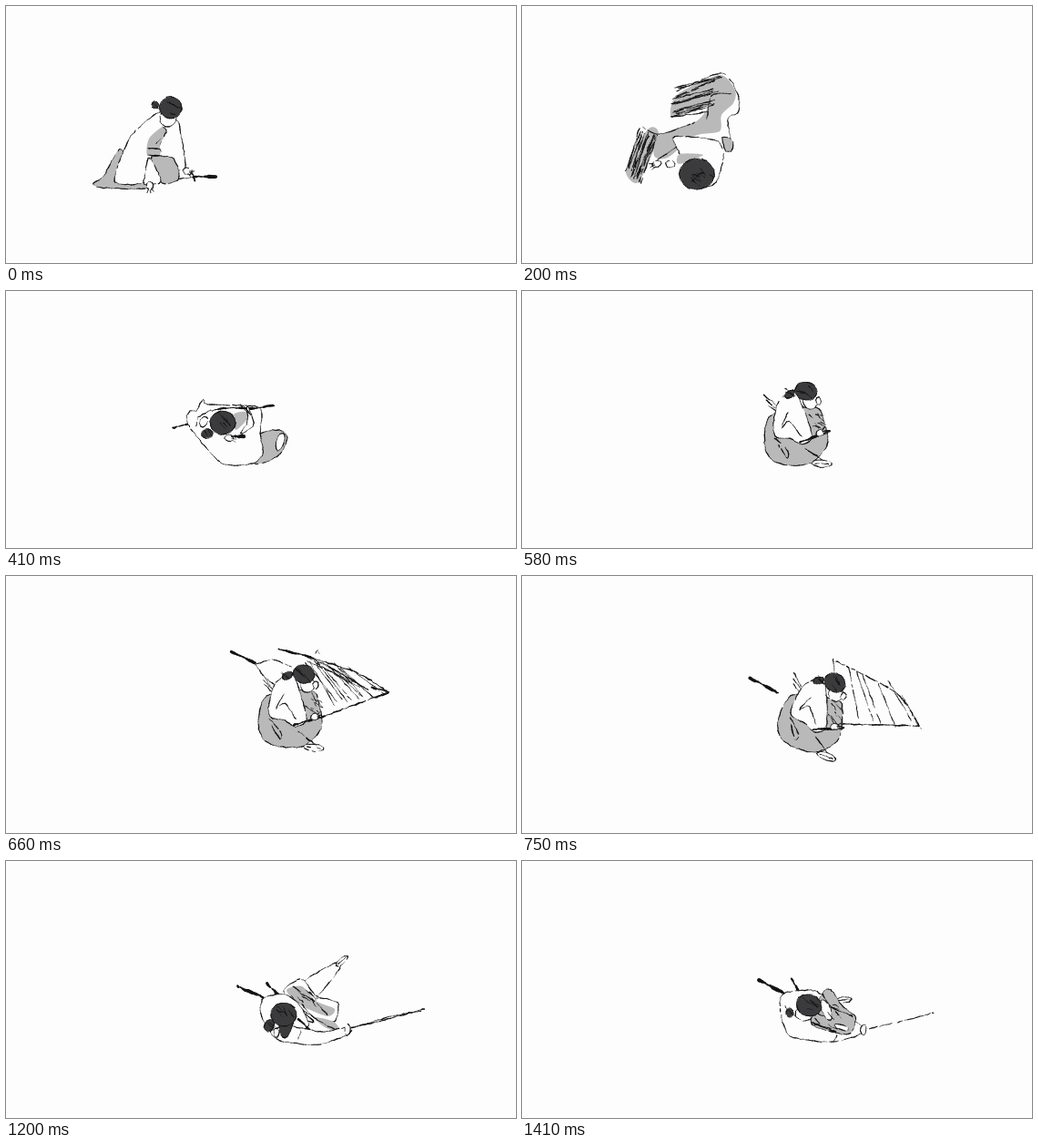
These frames come from a looping animation (560 by 283 pixels, 1.83 s). An HTML page with a canvas:

```html
<!DOCTYPE html>
<html lang="en">
<head>
<meta charset="utf-8">
<title>Sword roll</title>
<style>
html, body { margin: 0; width: 100%; height: 100%; overflow: hidden; background: #fdfdfd; }
canvas { display: block; width: 100vw; height: 100vh; }
</style>
</head>
<body>
<canvas id="stage"></canvas>
<script>
const W = 560, H = 283, LOOP = 1830;
const PAPER = '#fdfdfd', GREY = '#b9b9b9', HAIR = '#3b3b3d', INK = '#141414';
const canvas = document.getElementById('stage');
const ctx = canvas.getContext('2d');
const ratio = window.devicePixelRatio || 1;
canvas.width = W * ratio;
canvas.height = H * ratio;

let seed = 1;
function rand() {
  seed = (seed * 16807) % 2147483647;
  return seed / 2147483647;
}
const jitter = size => (rand() - 0.5) * size;
const mix = (a, b, t) => a + (b - a) * t;
const parse = s => s.split(' ').map(p => p.split(',').map(Number));

// Samples a tight spline through a few key points.
function curve(s, closed) {
  const p = parse(s), n = p.length, out = [];
  const at = i => closed ? p[(i + n) % n] : p[Math.max(0, Math.min(n - 1, i))];
  for (let i = 0; i < (closed ? n : n - 1); i++) {
    const [a, b, c, d] = [at(i - 1), at(i), at(i + 1), at(i + 2)];
    const steps = Math.max(2, Math.ceil(Math.hypot(c[0] - b[0], c[1] - b[1]) / 3));
    for (let k = 0; k < steps; k++) {
      const t = k / steps, u = t * t, v = u * t;
      out.push([0, 1].map(j =>
        b[j] * (2 * v - 3 * u + 1) + c[j] * (3 * u - 2 * v) +
        0.4 * ((c[j] - a[j]) * (v - 2 * u + t) + (d[j] - b[j]) * (v - u))));
    }
  }
  out.push(at(closed ? 0 : n - 1));
  return out;
}

function ellipse(x, y, rx, ry, tilt = 0) {
  const out = [], n = Math.ceil((rx + ry) * 1.2);
  for (let i = 0; i <= n; i++) {
    const a = i / n * 2 * Math.PI, u = rx * Math.cos(a), v = ry * Math.sin(a);
    out.push([x + u * Math.cos(tilt) - v * Math.sin(tilt), y + u * Math.sin(tilt) + v * Math.cos(tilt)]);
  }
  return out;
}

function paint(path, color) {
  ctx.fillStyle = color;
  ctx.beginPath();
  path.forEach(([x, y]) => ctx.lineTo(x, y));
  ctx.fill();
}

// A shaky pen line: pressure wavers, and thin lines lift off now and then.
function trace(path, width) {
  const phase = rand() * 9;
  const p = path.map(([x, y]) => [x + jitter(1), y + jitter(1)]);
  ctx.strokeStyle = INK;
  for (let i = 1; i < p.length; i++) {
    if (width < 1.5 && rand() < 0.07) continue;
    ctx.lineWidth = width * (0.85 + 0.35 * Math.sin(i * 0.9 + phase) + jitter(0.4));
    ctx.beginPath();
    ctx.moveTo(...p[i - 1]);
    ctx.lineTo(...p[i]);
    ctx.stroke();
  }
}

const fill = (s, color = GREY) => paint(curve(s, true), color);
const ink = (s, width = 1) => trace(curve(s), width);

function cloth(s, color = PAPER) {
  fill(s, color);
  trace(curve(s, true), 1);
}

function oval(x, y, rx, ry, tilt, color = PAPER) {
  const path = ellipse(x, y, rx, ry, tilt);
  paint(path, color);
  trace(path, 1);
}

// Short random creases inside an ellipse.
function creases(x, y, rx, ry, count) {
  for (let i = 0; i < count; i++) {
    const a = rand() * 2 * Math.PI, r = Math.sqrt(rand());
    const cx = x + rx * r * Math.cos(a), cy = y + ry * r * Math.sin(a);
    const dx = 2 + rand() * 3, dy = 1 + rand() * 4;
    ink(`${cx - dx},${cy - dy} ${cx + jitter(2)},${cy} ${cx + dx},${cy + dy}`, 0.9);
  }
}

function hair(x, y, rx, ry, tilt = 0) {
  oval(x, y, rx, ry, tilt, HAIR);
  creases(x, y, rx * 0.6, ry * 0.6, Math.round(rx / 3));
}

function lock(s) {
  fill(s, HAIR);
  trace(curve(s, true), 1);
}

// Quick strokes from one edge to another.
function hatch(count, from, to, width = 0.9, slack = 7) {
  const [a, b] = parse(from), [c, d] = parse(to);
  const spot = (p, q, t) => [0, 1].map(j => mix(p[j], q[j], t) + jitter(slack));
  for (let i = 0; i < count; i++) {
    const t = i / (count - 1);
    ink(spot(a, b, t) + ' ' + spot(c, d, t), width);
  }
}

// Three fingers reaching out from a small palm.
function hand(x, y, angle) {
  oval(x, y, 5, 3.5, angle);
  for (const spread of [-0.5, 0, 0.5]) {
    const a = angle + spread;
    ink(`${x + 3 * Math.cos(a)},${y + 3 * Math.sin(a)} ${x + 8 * Math.cos(a)},${y + 8 * Math.sin(a)}`);
  }
}

function foot(x, y, angle, size = 8) {
  oval(x, y, size, size * 0.36, angle);
  const c = Math.cos(angle) * size * 0.7, s = Math.sin(angle) * size * 0.7;
  ink(`${x - c},${y - s} ${x + c},${y + s}`);
}

function kneel() {
  cloth('126,158 107,188 96,195 104,200 152,201 152,194', GREY);
  cloth('168,117 139,141 125,170 120,194 152,194 159,167 180,130');
  cloth('176,130 188,126 192,140 197,176 188,180 168,166');
  fill('172,133 157,146 155,164 169,164 169,152 177,138');
  cloth('160,167 182,167 189,179 189,192 170,194', GREY);
  cloth('157,167 168,186 169,195 152,196 153,184');
  ink('172,133 176,139 165,152');
  ink('156,157 169,158 168,165 156,164', 1.3);
  hand(158, 198, 1.5);
  oval(178, 123, 9, 10);
  hair(164, 109, 4, 4);
  hair(181, 112, 12, 12);
  hand(199, 182, 0.5);
  ink('190,190 207,189');
  ink('204,181 207,193', 1.5);
  ink('207,188 230,188', 3.2);
}

function tumble() {
  fill('217,76 234,93 232,107 219,120 217,138 190,143 160,167 145,165 150,143 190,128 204,110 165,123 170,98');
  fill('139,135 150,143 128,194 114,180');
  ink('170,94 219,74 236,95 238,116 226,124 230,149');
  hatch(13, '216,78 206,114', '172,92 166,123', 1.1, 10);
  hatch(13, '130,137 149,144', '115,179 129,195', 1.1, 6);
  ink('229,97 209,98 203,124');
  ink('132,133 151,141 190,128');
  cloth('220,145 231,148 231,158 224,160', GREY);
  cloth('168,144 213,148 221,165 213,194 190,198 172,160');
  fill('173,163 199,164 172,174');
  ink('170,155 144,173');
  hand(148, 174, 2.7);
  oval(163, 174, 5, 4);
  hair(192, 185, 19, 17);
  ink('187,193 197,184 211,188', 1.3);
}

function ball() {
  cloth('276,159 300,153 309,162 299,181 273,190', GREY);
  oval(301, 166, 4, 10, 0.3);
  ink('183,151 202,146', 2.1);
  cloth('200,147 202,132 209,132 216,120 222,125 260,126 280,130 279,157 282,179 270,190 236,189');
  ink('209,149 211,139 226,131');
  fill('250,136 263,133 264,142 252,153');
  hair(221, 157, 6, 5);
  hair(238, 145, 14, 13);
  oval(217, 144, 4, 6, 0.5);
  ink('226,132 239,129 270,129', 1.8);
  hand(245, 162, 0.1);
  ink('251,160 261,160', 4);
  cloth('265,127 272,147 258,157 265,144');
  creases(264, 131, 5, 3, 4);
  ink('268,130 294,126', 2.2);
}

function crouch() {
  hatch(3, '281,108 283,120', '293,120 291,127', 1.1, 2);
  cloth('286,132 277,163 284,181 302,188 327,187 346,168 344,142 335,126', GREY);
  cloth('313,106 295,119 288,145 291,156 306,159 318,166 330,158 321,122');
  ink('305,130 297,146 306,140 318,157');
  ink('289,157 302,172 301,180 292,165', 1.2);
  ink('321,171 339,185', 1.3);
  creases(337, 140, 8, 9, 8);
  oval(331, 120, 8, 8);
  hair(309, 110, 6, 4, -0.5);
  hair(327, 108, 12, 10, 0.3);
  oval(340, 120, 3, 4);
  foot(338, 189, 0.1, 11);
  ink('316,164 349,154', 2.4);
  hand(339, 155, -0.3);
}

// The cloud of strokes behind a swinging blade.
function sweep(start, bend, tip, hilt, lines) {
  ink(`${start} ${bend} ${tip}`, 1.3);
  hatch(lines, `${start} ${bend}`, `${hilt} ${tip}`, 0.85, 14);
  ink(`${tip} ${hilt}`, 1.4);
}

function slash() {
  ink('247,83 274,96', 2.6);
  ink('273,96 290,121');
  ink('275,97 292,92 313,100');
  ink('299,80 334,89', 2.2);
  ink('340,85 342,82 344,86');
  sweep('325,87', '384,106', '420,128', '348,155', 0);
  hatch(11, '328,92 375,105', '360,139 410,129', 0.85, 11);
  hatch(6, '330,90 346,97', '375,115 398,124', 0.85, 6);
  ink('402,123 420,128 406,134', 1.8);
  crouch();
}

function swing() {
  ink('250,112 281,129', 3);
  sweep('345,94', '410,128', '436,165', '352,163', 7);
  moved(crouch, 4, 5, 0.25, 315, 160);
}

// The outstretched arm, its hand and the long blade.
function reach(elbow, tip, width) {
  cloth(`291,187 301,198 ${elbow} 377,190 375,183 347,188 312,182`);
  ink('324,187 321,196');
  oval(375, 186, 3, 6, 0.1);
  ink(`378,184 404,178 ${tip}`, width);
}

function kick() {
  cloth('338,83 318,118 335,112 347,86');
  foot(347, 80, -0.25, 10);
  cloth('320,106 294,143 316,149 343,166 357,157 355,139 336,113');
  fill('318,119 331,120 340,131 347,152 339,159 309,143');
  ink('354,145 358,152', 1.7);
  ink('250,142 279,151', 3.8);
  ink('278,136 288,145', 2.8);
  cloth('276,154 303,146 327,163 329,177 290,182');
  ink('293,147 313,154 328,174', 1.2);
  creases(308, 158, 14, 5, 5);
  cloth('327,163 346,165 366,187 345,189 328,176', GREY);
  oval(350, 178, 10, 3, 0.7);
  reach('340,199', '452,167');
  lock('290,170 300,185 290,183 285,191 281,184');
  lock('308,167 317,174 311,187 317,206 306,200');
  hair(302, 175, 14, 11);
  ink('316,166 328,172 322,177', 1.7);
}

function lower() {
  cloth('362,112 325,135 341,149 367,117');
  foot(369, 110, -0.7, 8);
  cloth('320,131 329,133 341,149 364,156 360,177 335,170 305,145');
  fill('308,142 325,138 340,154 361,163 353,171 322,158');
  creases(334, 152, 17, 9, 8);
  ink('315,138 339,155 354,170', 1.1);
  ink('254,138 282,150', 3.4);
  ink('287,135 298,147', 3.2);
  cloth('283,151 308,147 326,164 331,183 298,192 280,170');
  fill('338,172 360,177 367,189 350,183');
  ink('325,158 340,174 366,188');
  ink('321,174 333,186', 2.8);
  ink('329,168 338,177 332,176', 1.6);
  reach('343,202', '459,163', 1.2);
  ink('380,184 420,172 455,165');
  lock('300,172 315,176 309,194 302,192');
  hair(289, 181, 5, 7, 0.4);
  hair(305, 169, 14, 13);
  oval(297, 189, 3, 5);
}

function settle() {
  foot(353, 153, -0.1, 9);
  ink('260,131 288,146', 3.6);
  ink('296,130 303,143', 3);
  cloth('283,155 290,145 322,143 340,160 376,186 342,199 297,194 287,180');
  cloth('330,146 339,142 352,160 366,172 358,191 318,179', GREY);
  oval(334, 164, 5, 12, -0.4);
  oval(351, 183, 8, 3, 0.3);
  creases(341, 172, 18, 13, 9);
  ink('330,147 340,161 363,171', 1.2);
  ink('318,178 344,188', 1.7);
  ink('346,192 342,199');
  hair(294, 167, 4, 5);
  oval(310, 168, 10, 8);
  hair(315, 159, 14, 12, 0.3);
  oval(375, 186, 3, 6, 0.1);
  ink('378,185 415,177 452,167');
}

// Turns a pose about a pivot and shifts it.
function moved(pose, dx, dy, angle, px, py) {
  ctx.save();
  ctx.translate(px + dx, py + dy);
  ctx.rotate(angle);
  ctx.translate(-px, -py);
  pose();
  ctx.restore();
}

const roll = turn => () => moved(ball, 25 * turn, 0, 0.45 * turn, 245, 156);
const rise = () => moved(crouch, -11, 3, -0.08, 315, 160);

const score = [
  [0, kneel], [200, tumble], [330, roll(-1)], [410, roll(0)], [500, roll(1)], [580, rise],
  [660, slash], [750, swing], [830, kick], [1200, lower], [1410, settle]
];

const start = performance.now();
function draw() {
  const time = Math.max(0, performance.now() - start) % LOOP;
  const [begin, pose] = score.filter(([t]) => t <= time).pop();
  seed = begin + 77;
  ctx.setTransform(ratio, 0, 0, ratio, 0, 0);
  ctx.lineCap = ctx.lineJoin = 'round';
  ctx.fillStyle = PAPER;
  ctx.fillRect(0, 0, W, H);
  pose();
  requestAnimationFrame(draw);
}
draw();
</script>
</body>
</html>
```
